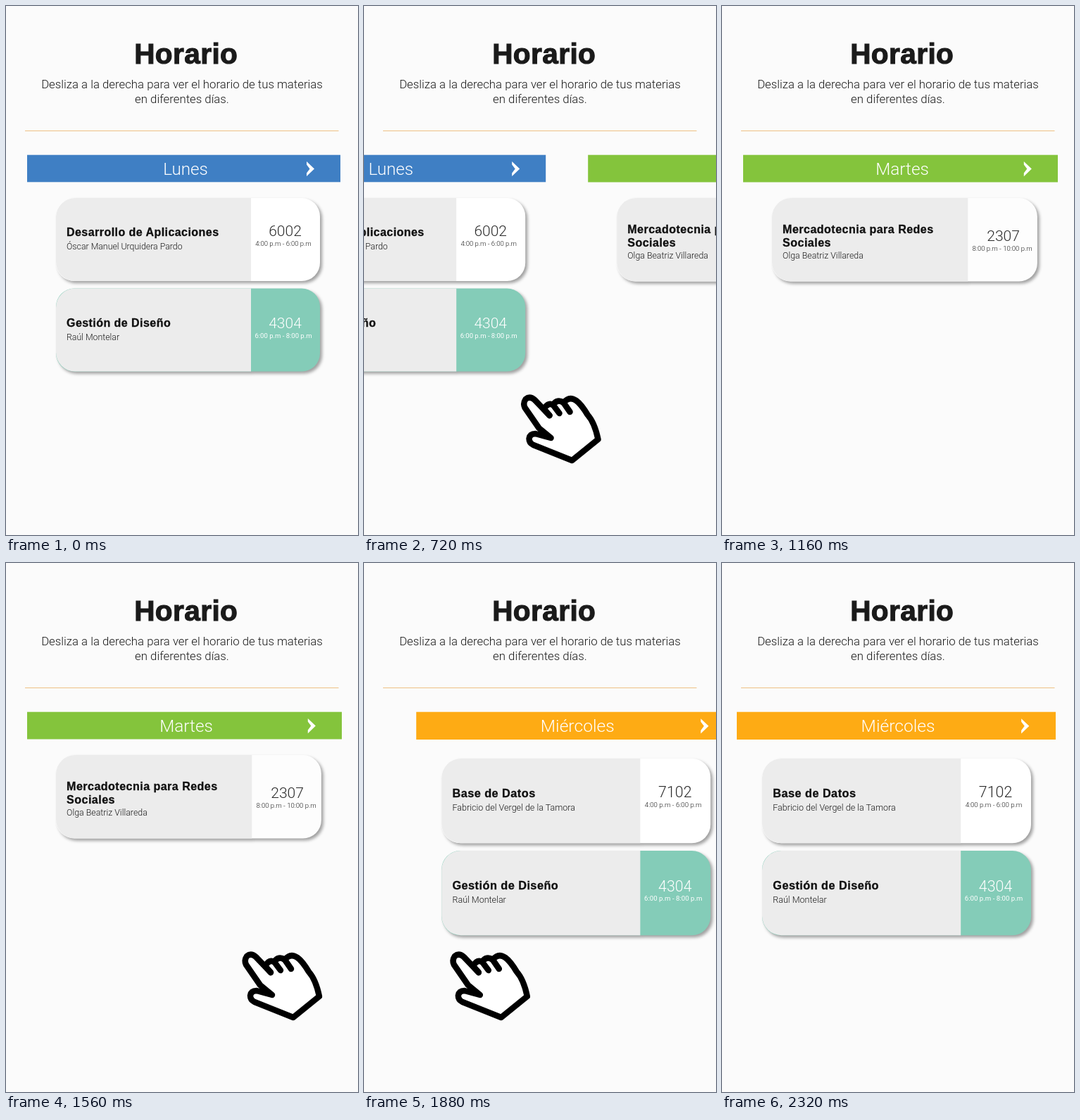
An HTML page that plays this animation: 500 by 752 pixels, repeating every 3000 ms.

```html
<!DOCTYPE html>
<html lang="es">
<head>
<meta charset="utf-8">
<title>Horario</title>
<style>
  html, body { margin: 0; width: 100%; height: 100%; overflow: hidden; background: #fbfbfb; }
  svg { display: block; width: 500px; height: 752px; }
  text { font-family: Roboto, Inter, sans-serif; font-weight: 300; fill: #1a1a1a; }
  .mid { text-anchor: middle; }
  .title, .subject { font-family: "Liberation Sans", Arial, sans-serif; font-weight: 700; }
  .title { font-size: 40.6px; letter-spacing: .4px; stroke: #1a1a1a; stroke-width: 1.1; }
  .subject { font-size: 16px; letter-spacing: .45px; fill: #111; stroke: #111; stroke-width: .3; }
  .intro { font-size: 16.8px; }
  .day { font-size: 24.2px; fill: #fff; }
  .teacher { font-size: 12.3px; }
  .room { font-size: 21px; fill: #2c2c2c; }
  .hours { font-size: 9.5px; }
  .light { fill: #fff; }
  .hours.light { font-weight: 400; }
  .box { filter: drop-shadow(3px 3px 2px rgba(0, 0, 0, .36)); }
</style>
</head>
<body>
<svg viewBox="0 0 500 752">
  <text class="title mid" x="255.7" y="81.6">Horario</text>
  <text class="intro mid" x="250" y="117">Desliza a la derecha para ver el horario de tus materias</text>
  <text class="intro mid" x="250" y="138">en diferentes días.</text>
  <path d="M27 177.5H472.5" stroke="#efc184" stroke-width="1.2"/>
  <g id="strip"></g>
  <g id="hand" fill="#fff" stroke="#000" stroke-width="8.5" stroke-linecap="round" stroke-linejoin="round">
    <path d="M376 582L355 560Q348 554 342 559Q338 565 341 571L361 600L378 614L356 608Q348 608 347 615Q347 621 353 624L408 646L445 616Q440 592 430 581Q421 566 414 561Q404 554 396 564Q387 558 381 567Q374 563 368 573Z"/>
    <path fill="none" d="M368 573L376 582M381 567L390 579M396 564L405 577"/>
  </g>
</svg>
<script>
const MARTES_X = 505, MIERCOLES_X = 1045, HAND_TRAVEL = 262;
const TEAL = '#84ccb8';

const text = (cls, x, y, str) => `<text class="${cls}" x="${x}" y="${y}">${str}</text>`;

function card({ x, y, scale = 1, subject, teacher, room, hours, fill = '#fff' }) {
  const tone = fill === TEAL ? ' light' : '';
  const extra = subject.length - 1;
  const drop = extra ? 7 : tone ? 2.5 : 0;
  const top = extra ? 49.5 : 54;
  return `<g transform="translate(${x} ${y}) scale(${scale})">
    <g class="box">
      <rect width="375" height="118" rx="26" fill="${fill}"/>
      <path d="M277 0H27A27 27 0 0 0 0 27V91A27 27 0 0 0 27 118H277Z" fill="#ececec"/>
    </g>
    ${subject.map((line, i) => text('subject', 15, top + i * 19.5, line)).join('')}
    ${text('teacher', 15, extra ? 85.5 : 73, teacher)}
    ${text('room mid' + tone, extra ? 327 : 325.5, 54 + drop, room)}
    ${text('hours mid' + tone, extra ? 325.5 : 323, 67.5 + drop, hours)}
  </g>`;
}

function bar(x, scale, color, day) {
  return `<g transform="translate(${x} 211.7) scale(${scale})">
    <rect width="445" height="38.6" fill="${color}"/>
    ${text('day mid', 225, 28.1, day)}
    <path d="M397 9.3L408 19.8L397 30.3V25.8L401.5 19.8L397 13.8Z" fill="#fff"/>
  </g>`;
}

const design = { subject: ['Gestión de Diseño'], teacher: 'Raúl Montelar', room: '4304',
  hours: '6:00 p.m - 8:00 p.m', fill: TEAL };

const strip = document.getElementById('strip');
const hand = document.getElementById('hand');

strip.innerHTML = [
  bar(30, 1, '#3f7fc4', 'Lunes'),
  card({ x: 71, y: 273, subject: ['Desarrollo de Aplicaciones'],
    teacher: 'Óscar Manuel Urquidera Pardo', room: '6002', hours: '4:00 p.m - 6:00 p.m' }),
  card({ x: 71, y: 401.5, ...design }),

  bar(MARTES_X + 30, 1.0045, '#84c43c', 'Martes'),
  card({ x: MARTES_X + 71, y: 273, scale: 1.005, subject: ['Mercadotecnia para Redes', 'Sociales'],
    teacher: 'Olga Beatriz Villareda', room: '2307', hours: '8:00 p.m - 10:00 p.m', fill: '#fdfdfd' }),

  bar(MIERCOLES_X + 21, 1.018, '#feab14', 'Miércoles'),
  card({ x: MIERCOLES_X + 57, y: 278, scale: 1.0187, subject: ['Base de Datos'],
    teacher: 'Fabricio del Vergel de la Tamora', room: '7102', hours: '4:00 p.m - 6:00 p.m' }),
  card({ x: MIERCOLES_X + 57, y: 409, scale: 1.0187, ...design })
].join('');

// Sine ease-out over 400 ms
const glide = (t, start) => Math.sin(Math.min(1, Math.max(0, (t - start) / 400)) * Math.PI / 2);
const shift = (el, x) => el.setAttribute('transform', `translate(${x.toFixed(2)} 0)`);

const origin = performance.now();
function draw() {
  const elapsed = (performance.now() - origin) % 3000;
  const t = Math.floor(elapsed / 40) * 40; // 25 pictures per second
  const second = t >= 1560;
  shift(strip, -MARTES_X * glide(t, 607) - (MIERCOLES_X - MARTES_X) * glide(t, 1594));
  shift(hand, -HAND_TRAVEL * glide(t, second ? 1638 : 607));
  const shown = second ? t < 2320 : t >= 520 && t < 1160;
  hand.setAttribute('visibility', shown ? 'visible' : 'hidden');
  requestAnimationFrame(draw);
}
draw();
</script>
</body>
</html>
```
